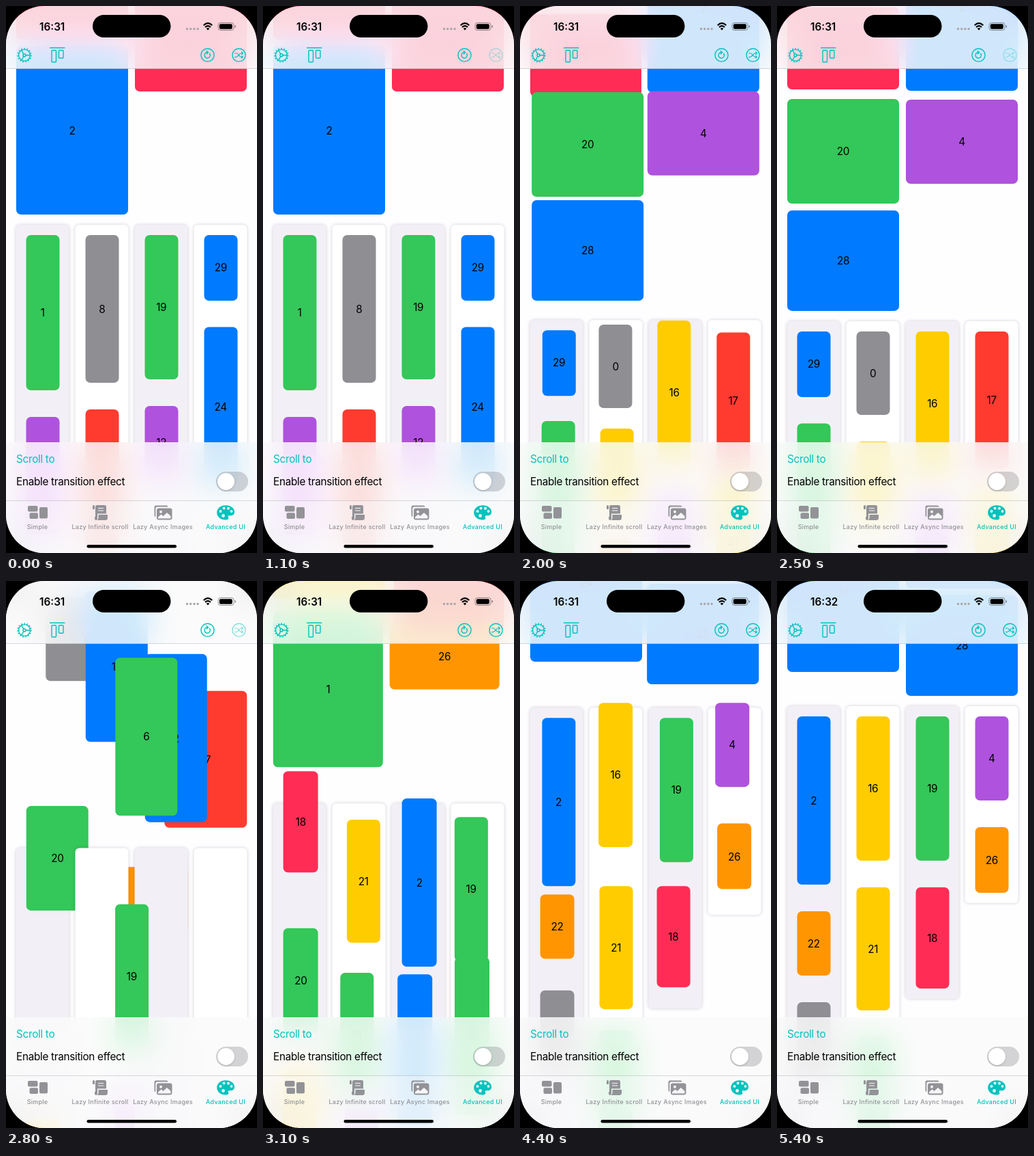
An HTML page that plays this animation: 368 px wide and 800 px high, repeating every 5.5 s.

```html
<!DOCTYPE html>
<html lang="en">
<head>
<meta charset="utf-8">
<title>Shuffled layout</title>
<style>
html, body { margin: 0; width: 100%; height: 100%; overflow: hidden; background: #000; }
#phone {
  position: relative; width: 368px; height: 800px; overflow: hidden;
  border-radius: 56px; background: #fefdff;
  font: 400 15.3px Inter, "Liberation Sans", sans-serif; letter-spacing: -.3px; color: #000;
}
#content { position: absolute; inset: 0; overflow: hidden; isolation: isolate; }
.panel, .card { position: absolute; left: 0; top: 0; }
.panel { width: 78px; border-radius: 6px; background: #fff; box-shadow: 0 0 5px rgba(0, 0, 0, .19); }
.panel.gray { background: #f2f0f6; }
.card { display: flex; align-items: center; justify-content: center; border-radius: 7px; overflow: hidden; }
.bar {
  position: absolute; left: 0; width: 368px;
  background: rgba(250, 250, 251, .83);
  -webkit-backdrop-filter: blur(24px) saturate(1.6);
  backdrop-filter: blur(24px) saturate(1.6);
}
#head { top: 0; height: 92px; box-shadow: inset 0 -1px rgba(0, 0, 0, .14); }
#foot { top: 638px; height: 162px; }
#tabs {
  position: absolute; top: 85px; width: 368px; height: 77px;
  background: rgba(247, 247, 248, .35); border-top: 1px solid rgba(0, 0, 0, .14); box-sizing: border-box;
}
#toggle { position: absolute; left: 308px; top: 43px; width: 47px; height: 29px; border-radius: 15px; background: rgba(120, 120, 128, .3); }
#toggle::after {
  content: ""; position: absolute; left: 2px; top: 2px; width: 25px; height: 25px;
  border-radius: 50%; background: #fff; box-shadow: 0 1px 3px rgba(0, 0, 0, .2);
}
svg { position: absolute; left: 0; top: 0; }
.line { fill: none; stroke: #00c3bd; stroke-width: 1.4; stroke-linecap: round; stroke-linejoin: round; }
.tab { font-size: 9px; font-weight: 500; letter-spacing: .25px; text-anchor: middle; fill: #929297; }
</style>
</head>
<body>
<div id="phone">
  <div id="content"></div>
  <div class="bar" id="head"></div>
  <div class="bar" id="foot"><div id="toggle"></div><div id="tabs"></div></div>
  <svg width="368" height="800" viewBox="0 0 368 800">
    <text id="clock" x="49" y="35.5" font-weight="600" letter-spacing="0"></text>
    <rect x="127" y="13" width="114.500" height="33" rx="16.500"/>
    <path d="M265.500 33.500H282" stroke="#aaa5aa" stroke-width="3.400" stroke-linecap="round" stroke-dasharray="0 5.200"/>
    <g fill="none" stroke="#000" stroke-width="2.100">
      <path d="M289.700 28.200Q296 22.200 302.300 28.200M292 31Q296 27.200 300 31"/>
      <path d="M296 35.500l-2.300-2.600q2.300-2 4.600 0z" fill="#000" stroke="none"/>
    </g>
    <rect x="311" y="24.500" width="23" height="11" rx="3.500" fill="none" stroke="#000" stroke-opacity=".4"/>
    <rect x="312.800" y="26.300" width="19" height="7.400" rx="2"/>
    <path d="M335.600 28v4q1.600-.7 1.600-2t-1.600-2z" fill-opacity=".45"/>

    <g class="line">
      <circle cx="27" cy="72" r="8.400"/>
      <circle cx="27" cy="72" r="9.700" stroke-width="1.800" stroke-dasharray="1.700 2.363" stroke-linecap="butt"/>
      <circle cx="27" cy="72" r="2"/>
      <path d="M29 72h6.400M26 70.300l-3.300-5.500M26 73.700l-3.300 5.500"/>
      <path d="M64.500 61.200h21.300"/>
      <rect x="67" y="64.700" width="6.500" height="17.300" rx="1"/>
      <rect x="77.500" y="64.700" width="6.500" height="11.500" rx="1"/>
      <circle cx="295.500" cy="71.800" r="9.600"/>
      <path d="M298.600 69.500a4.200 4.200 0 1 1-3-1.700M294.200 65.700l2.300 2.100-2.200 2.300"/>
      <g id="shuffle">
        <circle cx="341.500" cy="71.800" r="9.600"/>
        <path d="M335.500 69h2.200c2.600 0 4.200 5.600 7 5.600h2.500M335.500 74.600h2.200c2.600 0 4.200-5.600 7-5.600h2.500M345.600 67.200l1.800 1.800-1.800 1.800M345.600 72.800l1.800 1.800-1.800 1.800" stroke-width="1.200"/>
      </g>
    </g>

    <text x="15" y="668" fill="#00c3bd">Scroll to</text>
    <text x="15" y="700.500">Enable transition effect</text>

    <g fill="#929297">
      <rect x="32" y="731" width="14.500" height="8.500" rx="2"/>
      <rect x="34.500" y="741.300" width="12.500" height="8.700" rx="2"/>
      <rect x="49" y="733" width="12" height="16.500" rx="2"/>

      <path d="M127 731.500q0-1.500 1.500-1.500t1.500 1.500v4.500h-3zM131 732.500q0-2.500 2.500-2.500h11q2.500 0 2.500 2.500v10h-13v6.500q0 3-2 3t-2-3v-2h1z"/>
      <path d="M135.500 744H149v4.500q0 3.500-3.500 3.500H133q2.500-1 2.500-4z"/>
      <path d="M135 734.500h8M135 738h8" stroke="#f6f5f7" stroke-width="1.200"/>

      <path d="M217.500 745v-12q0-2.500 2.500-2.500h15q2.500 0 2.500 2H222q-2.700 0-2.700 2.700V747q-1.800 0-1.800-2z"/>
      <rect x="221" y="734.500" width="22.500" height="17" rx="3"/>
      <circle cx="227" cy="739.700" r="2" fill="#f6f5f7"/>
      <path d="M223 749.500v-2l4.500-4 3 2.500 5.500-5 5.500 5v3.500z" fill="#f6f5f7"/>
    </g>
    <path d="M322 730.300c8 0 13 4.500 13 9.500 0 4-3 6-6.500 5.500-3-.5-3.500 1-2.500 2.500 1.200 2-.5 3.700-4 3.700-7.500 0-12.800-4.700-12.800-10.500 0-6 5.500-10.700 12.800-10.700z" fill="#00c3bd"/>
    <g fill="#f4f7f8">
      <circle cx="314.500" cy="739" r="2"/><circle cx="319.500" cy="734.500" r="2"/>
      <circle cx="326" cy="734.800" r="2"/><circle cx="330.500" cy="739" r="1.900"/>
      <circle cx="318.500" cy="745.500" r="2.400"/>
    </g>
    <g class="tab">
      <text x="46" y="765">Simple</text>
      <text x="138" y="765">Lazy Infinite scroll</text>
      <text x="230" y="765">Lazy Async Images</text>
      <text x="322" y="765" fill="#00c3bd">Advanced UI</text>
    </g>
    <rect x="118.500" y="788" width="131.500" height="4.500" rx="2.250"/>
  </svg>
</div>
<script>
const LOOP = 5500, STEP = 100;
const STARTS = [1442, 2653, 3870], PRESSES = [1100, 2500, 3700];
const SIZE_LEAD = 40, GAP = 39, PAD = 15;

// Card heights by colour
const palette = {
  '#007aff': { 2: 246, 10: 220, 23: 220, 24: 232, 28: 147, 29: 95.5 },
  '#34c759': { 1: 227, 3: 150, 6: 231, 13: 180, 19: 211, 20: 153 },
  '#ff2d55': { 5: 120, 7: 120, 18: 148 },
  '#af52de': { 4: 123, 11: 172, 12: 106 },
  '#ffcc00': { 14: 170, 16: 211, 21: 180, 25: 127, 27: 150 },
  '#ff9500': { 22: 94, 26: 96 },
  '#ff3b30': { 17: 200 },
  '#8e8e93': { 0: 122, 8: 216 },
};

// Lanes as [centre, width]: two wide, four narrow, one drifting
const L = 0, R = 1, N = 2, DRIFT = 6;
const lanes = [[97, 164], [271, 164]];
for (let k = 0; k < 4; k++) lanes.push([53.75 + 87 * k, 48.5]);
lanes.push([276, 78]);

// cols are stacked inside the panels, loose cards have [lane, y]
const layouts = [
  { top: 320, cols: [[1, 11, 5], [8, 17], [19, 12], [29, 24]],
    loose: { 2: [L, 59], 18: [R, -23], 7: [L, -71], 0: [L, -324], 25: [R, -883],
      16: [L, -800], 20: [R, -664], 28: [R, -900], 4: [L, -830] } },
  { top: 461, cols: [[29, 19, 14, 13], [0, 25, 26], [16, 11], [17, 21]],
    loose: { 5: [L, 2], 20: [L, 136], 28: [L, 299], 2: [R, -122], 4: [R, 137],
      10: [L, -590], 6: [L, -361], 18: [L, -1200], 1: [N, -600] } },
  { top: 320, cols: [[18, 20, 14], [21, 13, 11], [2, 10], [19, 6]],
    loose: { 1: [L, 70], 26: [R, 34], 17: [R, -154], 0: [L, -427], 27: [L, -90], 3: [DRIFT, -838] } },
  { top: 183, cols: [[2, 22, 0], [16, 21, 1], [19, 18], [4, 26]], closed: [2, 3],
    loose: { 28: [R, 21], 23: [R, -209], 24: [L, -99], 11: [R, -720], 14: [L, -470],
      3: [DRIFT, 1000], 10: [N + 1, 1100], 20: [N + 1, 1100], 6: [N + 1, 1100], 13: [N + 1, 1100] } },
];

const content = document.getElementById('content');
const clock = document.getElementById('clock');
const shuffle = document.getElementById('shuffle');

function addBox(cls, z) {
  const el = document.createElement('div');
  el.className = cls;
  el.style.zIndex = z;
  return content.appendChild(el);
}

const cards = {};
for (const [color, heights] of Object.entries(palette)) {
  for (const [id, h] of Object.entries(heights)) {
    const el = addBox('card', 0);
    el.textContent = id;
    el.style.background = color;
    el.style.height = h + 'px';
    cards[id] = { el, h, poses: [] };
  }
}
const panels = [0, 1, 2, 3].map(k => addBox(k % 2 ? 'panel' : 'panel gray', 100 * (k + 1)));

layouts.forEach((layout, s) => {
  for (const id in cards) cards[id].poses[s] = layout.loose[id] || [L, -1000];
  layout.ends = layout.cols.map((ids, k) => {
    let y = layout.top + PAD;
    for (const id of ids) {
      cards[id].poses[s] = [N + k, y];
      y += cards[id].h + GAP;
    }
    return layout.closed && layout.closed.includes(k) ? y - GAP + PAD : 1500;
  });
});

const mix = (a, b, p) => a + (b - a) * p;

// Critically damped spring, response 0.55 s
function spring(ms) {
  const x = Math.max(0, ms) * 2 * Math.PI / 550;
  return 1 - (1 + x) * Math.exp(-x);
}

function depth([lane, y]) {
  const base = lane >= N && lane < DRIFT ? 100 * (lane - N + 1) + 30 : 50;
  return base + Math.round(y / 50);
}

function place(el, x, y, w) {
  el.style.transform = `translate(${x.toFixed(2)}px, ${y.toFixed(2)}px)`;
  el.style.width = w.toFixed(2) + 'px';
}

function buttonAlpha(t) {
  const i = PRESSES.filter(p => t >= p).length - 1;
  if (i < 0) return 1;
  return mix(.3, 1, Math.min(1, Math.max(0, (t - STARTS[i] - 60) / 350)));
}

function draw(t) {
  const n = STARTS.filter(s => t >= s - SIZE_LEAD).length;
  const from = Math.max(0, n - 1);
  const age = n ? t - STARTS[n - 1] : 0;
  const p = n ? spring(age) : 0, grow = n ? spring(age + SIZE_LEAD) : 0;

  for (const { el, poses } of Object.values(cards)) {
    const a = poses[from], b = poses[n];
    const [ca, wa] = lanes[a[0]], [cb, wb] = lanes[b[0]];
    const w = mix(wa, wb, grow);
    place(el, mix(ca, cb, p) - w / 2, mix(a[1], b[1], p), w);
    el.style.zIndex = depth(b);
  }
  const top = mix(layouts[from].top, layouts[n].top, p);
  panels.forEach((el, k) => {
    place(el, 14.5 + 87 * k, top, 78);
    el.style.height = mix(layouts[from].ends[k], layouts[n].ends[k], p) - top + 'px';
  });
  clock.textContent = t < 4700 ? '16:31' : '16:32';
  shuffle.setAttribute('opacity', buttonAlpha(t));
}

const begin = performance.now();
let shown = -1;
function tick() {
  const t = Math.floor((performance.now() - begin) % LOOP / STEP) * STEP;
  if (t !== shown) draw(shown = t);
  requestAnimationFrame(tick);
}
tick();
</script>
</body>
</html>
```
